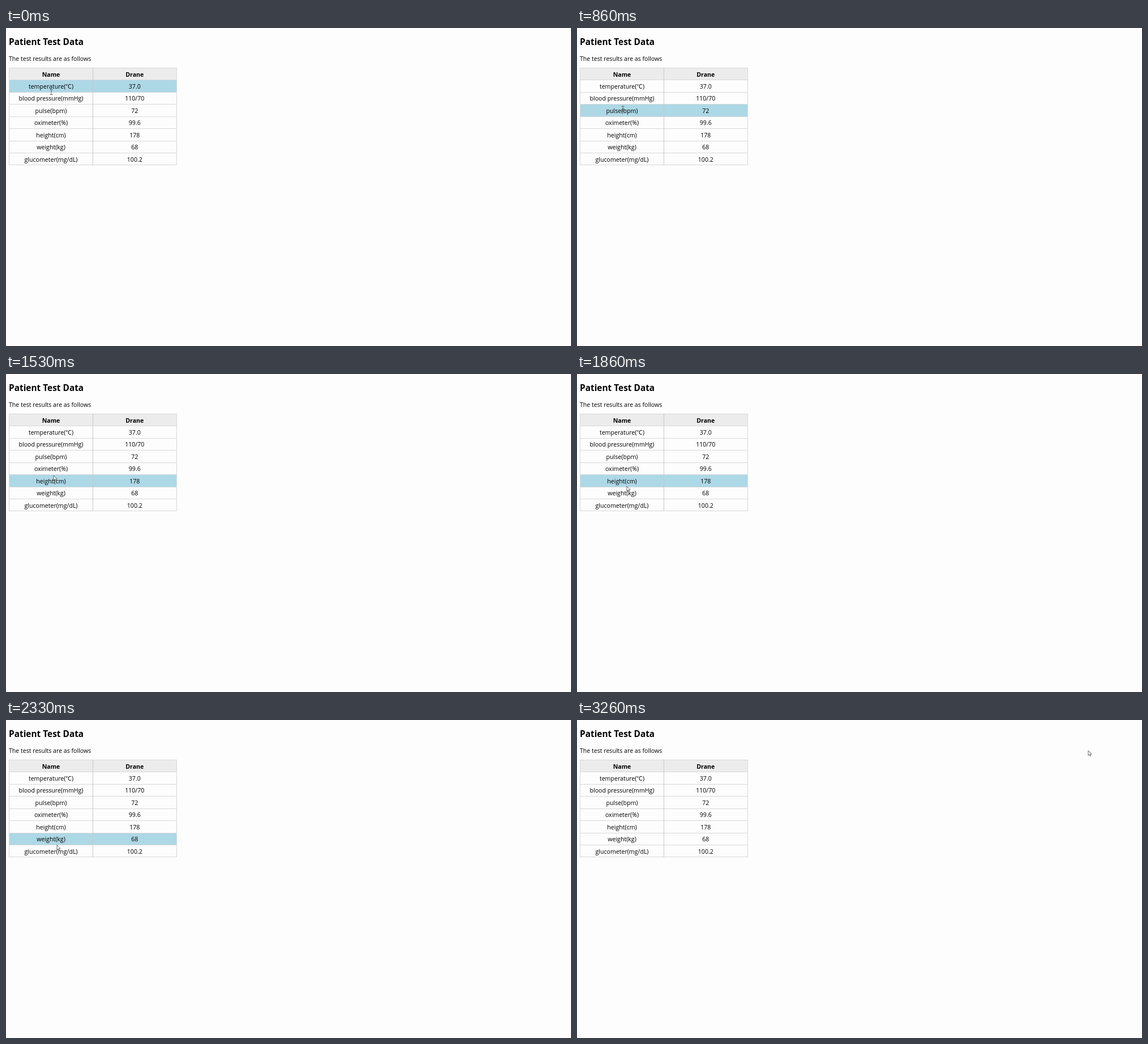
Write an HTML page that moves like this. It is 998 px wide and 561 px high and loops after 3.32 s.

```html
<!DOCTYPE html>
<html lang="en">
<head>
<meta charset="utf-8">
<title>Patient Test Data</title>
<style>
  html, body { margin: 0; width: 100%; height: 100%; overflow: hidden; background: #fdfdfd; }
  svg { display: block; }
  text { font: 10.6px "Open Sans", "Noto Sans CJK SC", sans-serif; fill: #000; }
  .title { font-size: 15.4px; font-weight: 700; }
  .cell { text-anchor: middle; }
  .head { font-weight: 700; }
  .line { stroke: #d8d8dc; shape-rendering: crispEdges; }
  .middle { stroke: #c8c8c8; }
</style>
</head>
<body>
<svg width="998" height="561" viewBox="0 0 998 561">
  <text class="title" x="5" y="29.5">Patient Test Data</text>
  <text x="5" y="57.7">The test results are as follows</text>
  <rect x="5" y="71" width="296" height="21" fill="#ececec"/>
  <rect id="highlight" x="5" width="296" fill="#add8e6"/>
  <g id="table"></g>
  <g id="cursor">
    <path id="arrow" d="M0 0V8.6L2 6.8L3.4 9.8L4.7 9.2L3.4 6.3H6Z"
          fill="#fff" stroke="#444" stroke-width=".8"/>
    <path id="beam" d="M-2.5 -4.5H2.5M0 -4.5V4.5M-2.5 4.5H2.5" fill="none" stroke="#555" stroke-width=".9"/>
  </g>
</svg>
<script>
const LOOP = 3320, STEP = LOOP / 50;
const TOP = 70.8, ROW = 21.45, LEFT = 5.5, MIDDLE = 153.5, RIGHT = 301.5;
const rows = [
  ["Name", "Drane"],
  ["temperature(℃)", "37.0"],
  ["blood pressure(mmHg)", "110/70"],
  ["pulse(bpm)", "72"],
  ["oximeter(%)", "99.6"],
  ["height(cm)", "178"],
  ["weight(kg)", "68"],
  ["glucometer(mg/dL)", "100.2"]
];
// Pointer path: time, x, y
const path = [
  [0, 80, 113], [260, 80, 113], [530, 82, 125], [1195, 80, 160], [1859, 88, 198],
  [2324, 90, 220.5], [2788, 95, 235], [2855, 100, 259], [2921, 150, 320],
  [2988, 290, 366], [3054, 480, 345], [3120, 680, 240], [3187, 850, 110], [3253, 903, 54]
];

const $ = id => document.getElementById(id);
const rowTop = i => Math.round(TOP + i * ROW);

function buildTable() {
  let svg = "";
  const line = (x1, y1, x2, y2, extra = "") =>
    svg += `<line class="line ${extra}" x1="${x1}" y1="${y1}" x2="${x2}" y2="${y2}"/>`;
  const bottom = rowTop(rows.length) + 0.5;
  for (let i = 0; i <= rows.length; i++) line(5, rowTop(i) - 0.5, 302, rowTop(i) - 0.5);
  for (const x of [LEFT, MIDDLE, RIGHT]) line(x, rowTop(0) - 1, x, bottom - 0.5, x === MIDDLE ? "middle" : "");
  rows.forEach((cells, i) => cells.forEach((label, column) => {
    const y = TOP + (i + 0.5) * ROW + 4;
    svg += `<text class="cell ${i ? "" : "head"}" x="${column ? 227.3 : 79.5}" y="${y}">${label}</text>`;
  }));
  $("table").innerHTML = svg;
}

function pointerAt(time) {
  const next = path.findIndex(p => p[0] > time);
  if (next < 0) return path[path.length - 1].slice(1);
  const [t0, x0, y0] = path[next - 1], [t1, x1, y1] = path[next];
  const k = (time - t0) / (t1 - t0);
  return [x0 + (x1 - x0) * k, y0 + (y1 - y0) * k];
}

function draw(now) {
  const step = Math.min(49, Math.floor((now % LOOP + 6) / STEP));
  const time = step * STEP;
  const [x, y] = pointerAt(time);
  const row = Math.floor((y - TOP) / ROW);
  const inTable = x < RIGHT && row > 0 && row < rows.length;
  const overText = inTable && (time < 260 || Math.abs(y - TOP - (row + 0.5) * ROW) < 6);

  $("highlight").style.display = inTable ? "" : "none";
  if (inTable) {
    $("highlight").setAttribute("y", rowTop(row));
    $("highlight").setAttribute("height", rowTop(row + 1) - rowTop(row));
  }
  $("cursor").setAttribute("transform", `translate(${x} ${y})`);
  $("beam").style.display = overText ? "" : "none";
  $("arrow").style.display = overText ? "none" : "";
}

function tick() {
  draw(performance.now() - start);
  requestAnimationFrame(tick);
}

buildTable();
const start = performance.now();
tick();
</script>
</body>
</html>
```
